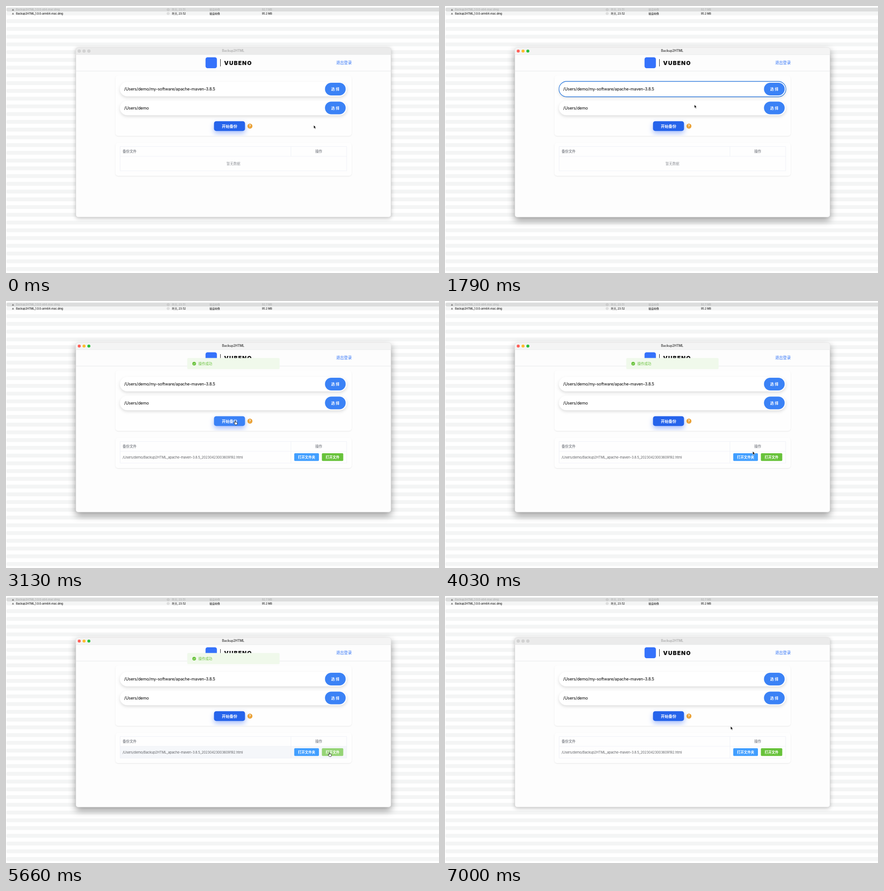
Write an HTML page that moves like this. It is 952 px wide and 588 px high and loops after 8000 ms.

```html
<!DOCTYPE html>
<html lang="zh-CN">
<head>
<meta charset="utf-8">
<title>Backup2HTML</title>
<style>
html, body { margin: 0; width: 100%; height: 100%; overflow: hidden; background: #fff; }
svg { display: block; }
text { font: 7.6px Inter, 'Noto Sans CJK SC', 'Noto Sans CJK', sans-serif; }
.mid { text-anchor: middle; }
.bold { font-weight: 700; }
.white { fill: #fff; }
.files text { font-size: 5.85px; font-weight: 500; letter-spacing: -.015em; }
#frame { fill: #fdfdfd; stroke: #c9c9c9; stroke-width: .6; filter: drop-shadow(0 2px 4px rgba(0,0,0,.25)); }
#bar { fill: #ebebeb; }
#title { font-size: 7px; font-weight: 600; fill: #adadad; letter-spacing: -.015em; }
#lights circle { fill: #d2d2d2; stroke: #c4c4c4; stroke-width: .4; }
.active #frame { filter: drop-shadow(0 7px 8px rgba(0,0,0,.4)); }
.active #bar { fill: #f4f4f4; }
.active #title { fill: #444; }
.active #lights circle { fill: var(--c); stroke: none; }
.card { fill: #fefefe; filter: drop-shadow(0 1px 1px rgba(0,0,0,.09)); }
.pill { fill: #fff; filter: drop-shadow(0 3px 3px rgba(0,0,0,.13)); }
.path { font-size: 9.07px; letter-spacing: -.015em; }
.pick { fill: #3b82f6; }
.pickText { font-size: 8.2px; }
#focus { fill: none; stroke: #347fdf; stroke-width: 1.3; }
#start { fill: #2563eb; filter: drop-shadow(0 5px 6px rgba(59,110,246,.45)); }
#start.hover { fill: #3b82f6; }
.grid { fill: none; stroke: #ebeef5; stroke-width: .8; }
.head { fill: #909399; font-weight: 600; }
#green { fill: #67c23a; }
#green.hover { fill: #95d475; }
#green.press { fill: #529b2e; }
</style>
</head>
<body>
<svg id="stage" width="952" height="588" viewBox="0 0 952 588">
  <defs>
    <pattern id="stripes" y="12.03" width="960" height="17.06" patternUnits="userSpaceOnUse">
      <rect x="1" width="970" height="8.53" rx="3" fill="#f4f5f5"/>
    </pattern>
    <clipPath id="cardClip"><rect x="240.5" y="153" width="519.5" height="133" rx="6"/></clipPath>
    <g id="disk"><path d="M15.3 6.2l1.5 2.6h-3z"/><path d="M13.3 9h4v1h-4z"/></g>
    <g id="cloud" fill="none" stroke="#aaa" stroke-width=".6"><circle cx="356.5" cy="8" r="2.5"/><path d="M355 8h3"/></g>
  </defs>

  <rect y="12" width="952" height="576" fill="url(#stripes)"/>
  <rect x="1" y="3.5" width="970" height="8.53" rx="3" fill="#dcdddd"/>
  <g class="files">
    <g fill="#b1b3b3">
      <use href="#disk" fill="#666"/><use href="#cloud"/>
      <text x="22" y="10.1">Backup2HTML_1.0.0-x64-mac.dmg</text>
      <text x="365" y="10.1">昨天, 23:51</text>
      <text x="447.5" y="10.1">磁盘映像</text>
      <text x="585" y="10.1" text-anchor="end">92.7 MB</text>
    </g>
    <g fill="#222">
      <use href="#disk" y="8.5" fill="#555"/><use href="#cloud" y="8.5"/>
      <text x="22" y="18.6">Backup2HTML_1.0.0-arm64-mac.dmg</text>
      <text x="365" y="18.6">昨天, 23:52</text>
      <text x="447.5" y="18.6">磁盘映像</text>
      <text x="585" y="18.6" text-anchor="end">95.2 MB</text>
    </g>
  </g>

  <rect id="frame" x="153.5" y="91.5" width="693" height="373.5" rx="5"/>
  <path id="bar" d="M153.5 107v-10.5a5 5 0 0 1 5-5h683a5 5 0 0 1 5 5v10.5z"/>
  <path d="M153.5 107h693M153.5 143.3h693" stroke="#e4e5e6" stroke-width=".8"/>
  <g id="lights">
    <circle cx="161" cy="99.2" r="3.3" style="--c:#ff5f57"/>
    <circle cx="171.6" cy="99.2" r="3.3" style="--c:#febc2e"/>
    <circle cx="182.2" cy="99.2" r="3.3" style="--c:#28c03c"/>
  </g>
  <text id="title" class="mid" x="499.5" y="101.4">Backup2HTML</text>

  <rect x="438.7" y="113" width="25" height="24" rx="4.5" fill="#3572fb"/>
  <path d="M471.5 117v16" stroke="#222"/>
  <text x="479.5" y="129.6" style="font-size:12.4px;font-weight:900;letter-spacing:1.3px" fill="#0c0c0c">VUBENO</text>
  <text x="726" y="128.3" style="font-size:8.55px" fill="#2f72f7">退出登录</text>

  <rect class="card" x="240.5" y="153" width="519.5" height="133" rx="6"/>
  <g clip-path="url(#cardClip)">
    <rect class="pill" x="250.5" y="167" width="499" height="32" rx="16"/>
    <rect class="pill" x="250.5" y="208.5" width="499" height="32" rx="16"/>
    <rect id="start" x="457.3" y="253.8" width="68.2" height="21.4" rx="5"/>
  </g>
  <rect id="focus" x="250.6" y="166" width="499" height="34" rx="17"/>
  <text class="path" x="259.8" y="186">/Users/demo/my-software/apache-maven-3.8.5</text>
  <text class="path" x="259.8" y="227.6">/Users/demo</text>
  <rect class="pick" x="701.3" y="169" width="45.5" height="28" rx="14"/>
  <rect class="pick" x="701.3" y="210.5" width="45.5" height="28" rx="14"/>
  <text class="pickText mid bold white" x="724" y="186">选 择</text>
  <text class="pickText mid bold white" x="724" y="227.5">选 择</text>
  <text class="mid bold white" x="491.4" y="267.7" style="font-size:8.5px">开始备份</text>
  <circle cx="536.3" cy="264.5" r="5.5" fill="#eaa136"/>
  <text class="mid bold white" x="536.3" y="267.4" style="font-size:8px">?</text>

  <rect id="card" class="card" x="240.5" y="301" width="519.5" rx="6"/>
  <rect id="rowBg" x="251" y="331" width="498" height="26" fill="#f5f7fa"/>
  <path id="grid" class="grid"/>
  <text class="head" x="256.5" y="323.3">备份文件</text>
  <text class="head mid" x="687.5" y="323.3">操作</text>
  <text id="empty" class="mid" x="500" y="350" fill="#909399">暂无数据</text>
  <g id="row">
    <text x="256.3" y="346.6" style="font-size:7.35px;letter-spacing:-.015em" fill="#606266">/Users/demo/Backup2HTML_apache-maven-3.8.5_20230423003609192.html</text>
    <rect x="633.7" y="335.3" width="54.3" height="17" rx="2" fill="#409eff"/>
    <rect id="green" x="694.5" y="335.3" width="47" height="17" rx="2"/>
    <text class="mid bold white" x="660.9" y="346.6">打开文件夹</text>
    <text class="mid bold white" x="718" y="346.6">打开文件</text>
  </g>

  <g id="toast">
    <rect x="398.5" y="125.5" width="203" height="24.6" rx="2.5" fill="#f0f9eb"/>
    <circle cx="413.7" cy="138" r="4" fill="#67c23a"/>
    <path d="M411.8 138.1l1.4 1.4 2.5-2.7" fill="none" stroke="#fff" stroke-width=".9"/>
    <text x="423" y="140.8" fill="#67c23a">操作成功</text>
  </g>

  <g id="cursor">
    <path id="arrow" d="M0 0v7.2l1.7-1.5 1.2 2.7 1.3-.6-1.2-2.6h2.2z" fill="#000" stroke="#fff" stroke-width=".6"/>
    <path id="hand" d="M-.7 0q.7-.8 1.4 0v2.8l3.2.6q1.1.3.9 1.5l-.6 2.4-.6 1.3h-3.8l-2.6-3.4q-.5-1 .5-1.1l1.6 1z" fill="#fff" stroke="#000" stroke-width=".75"/>
  </g>
</svg>
<script>
const LOOP = 8000, STEP = 148;
const $ = id => document.getElementById(id);
const clamp = v => Math.max(0, Math.min(1, v));
const show = (id, on) => $(id).style.display = on ? '' : 'none';

// start time, number of steps, end point of each pointer move
const moves = [
  [300, 3, 638, 125],
  [1200, 6, 503.5, 263.5],
  [2390, 1, 504, 264],
  [3580, 4, 676.5, 331],
  [4180, 2, 711, 345],
  [5960, 3, 701.5, 338.5],
  [6400, 3, 628, 287]
];

function pointer(t) {
  let x = 676.5, y = 262.5;
  for (const [start, steps, toX, toY] of moves) {
    const p = clamp((Math.floor((t - start) / STEP) + 1) / steps);
    x += (toX - x) * p;
    y += (toY - y) * p;
  }
  return [x, y];
}

function draw(now) {
  const t = now % LOOP;
  const within = (a, b) => t >= a && t < b;
  const done = t >= 2830;
  const startHover = within(1940, 3580);
  const greenHover = within(4320, 6850);

  $('stage').classList.toggle('active', within(1050, 6850));
  show('focus', within(1050, 2680));
  $('start').classList.toggle('hover', startHover);

  show('empty', !done);
  show('row', done);
  show('rowBg', within(4180, 6850));
  $('card').setAttribute('height', done ? 67 : 73);
  $('grid').setAttribute('d', `M251 309.5h498v${done ? 47.5 : 53.5}h-498zM251 331h498M626.5 309.5v${done ? 47.5 : 21.5}`);
  $('green').classList.toggle('hover', greenHover);
  $('green').classList.toggle('press', within(4620, 4770));

  const third = start => clamp(Math.floor((t - start) / 150) / 3);
  const shown = third(2680) - third(5660);
  $('toast').setAttribute('opacity', shown);
  $('toast').setAttribute('transform', `translate(0 ${-13 * (1 - shown)})`);

  const hand = startHover || within(4320, 6400);
  show('hand', hand);
  show('arrow', !hand);
  $('cursor').setAttribute('transform', `translate(${pointer(t)})`);
}

const begin = performance.now();
function tick() {
  draw(performance.now() - begin);
  requestAnimationFrame(tick);
}
tick();
</script>
</body>
</html>
```
